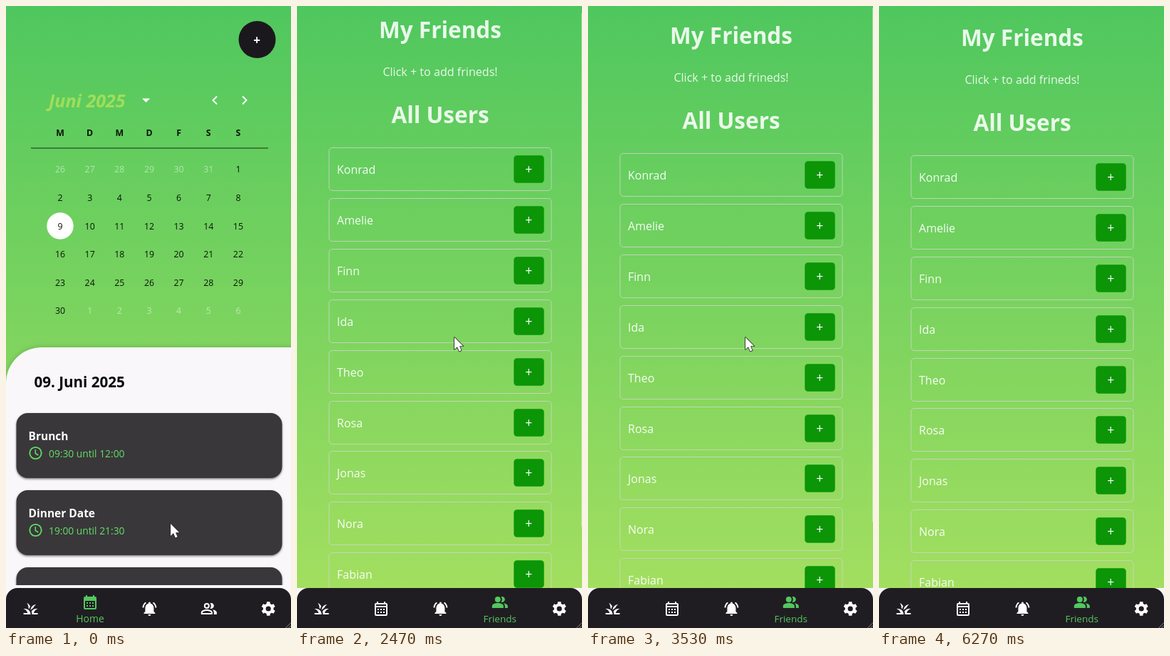
Write an HTML page with a canvas that moves like this. It is 400 px wide and 871 px high and loops after 6.34 s.

```html
<!DOCTYPE html>
<html lang="de">
<head>
<meta charset="utf-8">
<title>Calendar and friends</title>
<style>
  html, body { margin: 0; width: 100%; height: 100%; overflow: hidden; background: #7bd45f; }
  canvas { display: block; width: 100vw; height: 100vh; }
</style>
</head>
<body>
<canvas id="stage"></canvas>
<script>
const W = 400, H = 871, LOOP = 6340, STEP = 1000 / 15;
const SWITCH = 1270, LOADED = 1730;
const FACE = '"Open Sans", "Noto Sans", sans-serif';
const GREEN = '#54c75f', DARK = '#201d22', PAPER = '#f9f7fa', SOFT = 'rgba(255,255,255,.87)';
const FRIENDS = ['Konrad', 'Amelie', 'Finn', 'Ida', 'Theo', 'Rosa', 'Jonas', 'Nora', 'Fabian', 'Lotte'];

const canvas = document.getElementById('stage');
const g = canvas.getContext('2d');

const GRASS = new Path2D('M12 20H2v-2h5.75C7 15.2 4.8 13 2 12.26 2.64 12.1 3.3 12 4 12c4.42 0 8 3.58 8 8z' +
  'M22 12.26C21.36 12.1 20.7 12 20 12c-2.93 0-5.48 1.58-6.88 3.93.6 1.3.87 2.7.87 4.07h8v-2h-5.75c.74-2.8 2.95-5 5.76-5.74z' +
  'M15.64 11.02c.78-2.09 2.23-3.84 4.09-5C15.44 6.16 12 9.67 12 14c.95-1.25 2.2-2.28 3.64-2.98z' +
  'M11.42 8.85C10.58 6.66 8.88 4.89 6.7 4c1.44 1.86 2.3 4.18 2.26 7.32.43.24.83.52 1.22.82.2-1.18.65-2.3 1.24-3.29z');
const BELL = new Path2D('M7.58 4.08 6.15 2.65C3.75 4.48 2.17 7.3 2.03 10.5h2c.15-2.65 1.51-4.97 3.55-6.42z' +
  'M19.97 10.5h2c-.15-3.2-1.73-6.02-4.12-7.85l-1.42 1.43c2.02 1.45 3.39 3.77 3.54 6.42z' +
  'M18 11c0-3.07-1.64-5.64-4.5-6.32V4a1.5 1.5 0 0 0-3 0v.68C7.63 5.36 6 7.92 6 11v5l-2 2v1h16v-1l-2-2z' +
  'M10 20h4a2 2 0 0 1-4 0z');
const PEOPLE = new Path2D('M16.67 13.13C18.04 14.06 19 15.32 19 17v3h4v-3c0-2.18-3.57-3.47-6.33-3.87z' +
  'M15 12a4 4 0 1 0-1.33-7.76c1.77 2.2 1.77 5.3 0 7.52.42.14.86.24 1.33.24z' +
  'M9 12a4 4 0 1 0 0-8 4 4 0 0 0 0 8z' +
  'M9 13c-2.67 0-8 1.34-8 4v3h16v-3c0-2.66-5.33-4-8-4z');
const PEOPLE_LINES = new Path2D(PEOPLE);
PEOPLE_LINES.addPath(new Path2D('M9 6a2 2 0 1 1 0 4 2 2 0 0 1 0-4zM15 18H3v-1c.2-.7 3.3-2 6-2s5.8 1.3 6 2z'));
const HAND = new Path2D('M3.5 2a2 2 0 0 1 4 0v5.5l5.5 1.2q2 .5 2 2.5v3q0 2-1 4v3H5.5v-2.5L.8 13q-1-2 1-2.6l1.7 1.4z');
const ARROW = new Path2D('M0 0V17l4-3.7 2.7 6.2 2.9-1.2L7 12.2h5.2z');

// Value at time t along [time, value] points
function track(t, points, ease = u => u) {
  if (t <= points[0][0]) return points[0][1];
  for (let i = 1; i < points.length; i++) {
    const [t0, a] = points[i - 1], [t1, b] = points[i];
    if (t < t1) return a + (b - a) * ease((t - t0) / (t1 - t0));
  }
  return points[points.length - 1][1];
}
const smooth = u => u * u * (3 - 2 * u);

// mid is the vertical middle of the capitals
function text(s, x, mid, size, color, align = 'left', style = '') {
  g.font = `${style} ${size}px ${FACE}`;
  g.textAlign = align;
  g.fillStyle = color;
  g.fillText(s, x, mid + size * .357);
}

function box(x, y, w, h, r) {
  g.beginPath();
  g.roundRect(x, y, w, h, r);
}

function disc(x, y, r, color) {
  g.fillStyle = color;
  g.beginPath();
  g.arc(x, y, r, 0, Math.PI * 2);
  g.fill();
}

function line(points, color, width) {
  g.strokeStyle = color;
  g.lineWidth = width;
  g.beginPath();
  points.forEach(([x, y]) => g.lineTo(x, y));
  g.stroke();
}

function shadow(color, blur, y) {
  g.shadowColor = color;
  g.shadowBlur = blur;
  g.shadowOffsetY = y;
}

function background() {
  const fill = g.createLinearGradient(0, 0, 0, H);
  fill.addColorStop(0, '#4fc75e');
  fill.addColorStop(1, '#a8e060');
  g.fillStyle = fill;
  g.fillRect(0, 0, W, H);
}

function calendar() {
  text('Juni 2025', 60, 133, 25, '#a0de5a', 'left', 'italic bold');
  g.fillStyle = '#fff';
  g.beginPath();
  g.moveTo(191, 129.5);
  g.lineTo(202, 129.5);
  g.lineTo(196.5, 135);
  g.fill();
  line([[296, 126.5], [290.5, 132], [296, 137.5]], '#fff', 2);
  line([[332, 126.5], [337.5, 132], [332, 137.5]], '#fff', 2);
  line([[35, 199], [368, 199]], '#16300f', 1);
  const column = i => 76 + i * 41.65;
  [...'MDMDFSS'].forEach((d, i) => text(d, column(i), 178, 12.3, '#0a1408', 'center', 'bold'));
  disc(76, 308, 18.7, '#fff');
  for (let i = 0; i < 42; i++) {
    const outside = i < 6 || i > 35;
    const day = i < 6 ? 26 + i : i > 35 ? i - 35 : i - 5;
    text(day, column(i % 7), 229 + Math.floor(i / 7) * 39.6, 12.3,
      outside ? 'rgba(255,255,255,.5)' : '#0a1408', 'center');
  }
}

function eventCard(y, title, time) {
  g.save();
  shadow('rgba(0,0,0,.5)', 3, 1.5);
  g.fillStyle = '#3a373a';
  box(14.5, y, 373, 91, 16);
  g.fill();
  g.restore();
  if (!title) return;
  text(title, 31.5, y + 32.5, 15.5, '#fff', 'left', 'bold');
  g.strokeStyle = '#60e068';
  g.lineWidth = 1.8;
  g.beginPath();
  g.arc(41.5, y + 56, 8.2, 0, Math.PI * 2);
  g.stroke();
  line([[41.3, y + 51], [41.3, y + 56.5], [45.3, y + 59]], '#60e068', 1.5);
  text(time, 60, y + 57, 13.8, '#60e068');
}

function home() {
  disc(352.5, 47, 26, '#1b181d');
  text('+', 352, 47.5, 17, '#fff', 'center', 'bold');
  calendar();
  g.save();
  shadow('rgba(0,0,0,.2)', 7, 0);
  g.fillStyle = PAPER;
  box(0, 478, W + 20, H, [50, 0, 0, 0]);
  g.fill();
  g.restore();
  text('09. Juni 2025', 39.5, 527, 20.6, '#070707', 'left', 'bold');
  g.save();
  g.beginPath();
  g.rect(0, 478, W, 333);
  g.clip();
  eventCard(570, 'Brunch', '09:30 until 12:00');
  eventCard(678, 'Dinner Date', '19:00 until 21:30');
  eventCard(786);
  g.restore();
}

function friendCard(name, y) {
  g.strokeStyle = 'rgba(208,214,204,.8)';
  g.lineWidth = 1;
  box(45, y + .5, 312, 60, 4.5);
  g.stroke();
  text(name, 56, y + 31.3, 16, 'rgba(255,255,255,.93)');
  g.fillStyle = '#0b9507';
  box(304.3, y + 11.3, 42.4, 38.4, 4.5);
  g.fill();
  text('+', 325.3, y + 31, 17.5, '#fff', 'center');
}

function scrollbar(t, scroll) {
  const alpha = track(t, [[2370, 0], [2450, .4], [4150, .4], [4450, 0]]);
  g.fillStyle = `rgba(255,255,255,${alpha})`;
  g.fillRect(W - 1, Math.max(0, scroll * .9), 1, 720);
}

function friends(t) {
  const scroll = track(t, [[2370, 0], [2466, 10.7], [2670, 33], [2930, 58.5], [3100, 65], [3250, 54],
    [3400, 28], [3530, 3], [3680, -5], [4000, -3.3], [4400, -1], [4900, 0]]);
  g.save();
  g.translate(0, -scroll);
  text('My Friends', 201, 44.3, 31.5, SOFT, 'center', 'bold');
  text('Click + to add frineds!', 201, 103, 16.1, SOFT, 'center');
  text('All Users', 201, 163.7, 31.5, SOFT, 'center', 'bold');
  if (t < LOADED) text('No users yet', 201, 223, 15.9, SOFT, 'center');
  g.restore();
  if (t < LOADED) return;
  FRIENDS.forEach((name, i) => friendCard(name, Math.round(209.2 - scroll + i * 70.84)));
  scrollbar(t, scroll);
}

function icon(x, y, on, draw) {
  g.save();
  g.translate(x - 12, y - 12);
  g.fillStyle = g.strokeStyle = on ? GREEN : '#fff';
  draw(on);
  g.restore();
}

function month(on) {
  g.lineWidth = 2;
  box(4, 5, 16, 16, 1);
  g.stroke();
  g.fillRect(4, on ? 5 : 8, 16, on ? 5 : 2);
  for (const x of [6, 16]) g.fillRect(x, 2, 2, 3);
  for (const y of [12, 16])
    for (const x of [7, 11, 15]) g.fillRect(x, y, 2, 2);
}

function people(on) {
  if (on) g.fill(PEOPLE);
  else g.fill(PEOPLE_LINES, 'evenodd');
}

function gear() {
  g.beginPath();
  for (let k = 0; k < 6; k++) {
    for (const [turn, r] of [[-20, 7.4], [-13, 9.9], [13, 9.9], [20, 7.4]]) {
      const a = (k * 60 - 90 + turn) * Math.PI / 180;
      g.lineTo(12 + r * Math.cos(a), 12 + r * Math.sin(a));
    }
  }
  g.closePath();
  g.moveTo(15.6, 12);
  g.arc(12, 12, 3.6, 0, Math.PI * 2);
  g.fill('evenodd');
}

function ripple(t) {
  const grow = track(t, [[SWITCH - 60, 8], [1460, 50.5], [1600, 60]]);
  const fade = track(t, [[SWITCH - 60, 0], [SWITCH, 1], [1560, 1], [1780, 0]]);
  if (!fade) return;
  g.save();
  g.beginPath();
  g.rect(243, 815, 83.5, 56);
  g.clip();
  g.globalAlpha = fade * .09;
  disc(293, 846, grow, GREEN);
  g.restore();
}

function nav(t, onHome) {
  g.fillStyle = PAPER;
  g.fillRect(0, 815, W, H - 815);
  g.fillStyle = DARK;
  box(0, 815, W, 70, 16);
  g.fill();
  ripple(t);
  const active = onHome ? 1 : 3;
  const draws = [() => g.fill(GRASS), month, () => g.fill(BELL), people, gear];
  draws.forEach((draw, i) => {
    const on = i === active;
    icon(34.6 + i * 83.4, on ? 835 : 844, on, draw);
  });
  if (onHome) text('Home', 118, 858.5, 13.9, GREEN, 'center');
  else text('Friends', 284.7, 858.5, 13.5, GREEN, 'center');
  line([[392.5, 871], [400, 863.5]], '#8d8b8e', 1);
  line([[396.5, 871], [400, 867.5]], '#8d8b8e', 1);
}

function cursor(t) {
  const x = track(t, [[450, 231], [1050, 294], [1530, 294], [2100, 221], [4250, 221], [4620, 412]], smooth);
  const y = track(t, [[450, 725], [1050, 838], [1530, 838], [2100, 464]], smooth);
  if (x > W) return;
  const overNav = y > 815;
  g.save();
  g.translate(overNav ? x - 5.5 : x, y);
  const shape = overNav ? HAND : ARROW;
  g.lineJoin = 'round';
  g.lineWidth = 1.6;
  g.strokeStyle = '#222';
  g.stroke(shape);
  g.fillStyle = '#fff';
  g.fill(shape);
  g.restore();
}

function frame(now) {
  const t = Math.floor((now % LOOP + 4) / STEP) * STEP;
  const scale = window.devicePixelRatio || 1;
  const w = Math.round(innerWidth * scale), h = Math.round(innerHeight * scale);
  if (canvas.width !== w || canvas.height !== h) {
    canvas.width = w;
    canvas.height = h;
  }
  g.setTransform(w / W, 0, 0, h / H, 0, 0);
  const onHome = t < SWITCH;
  background();
  if (onHome) home();
  else friends(t);
  nav(t, onHome);
  cursor(t);
}

const start = performance.now();
(function tick() {
  frame(performance.now() - start);
  requestAnimationFrame(tick);
})();
</script>
</body>
</html>
```
